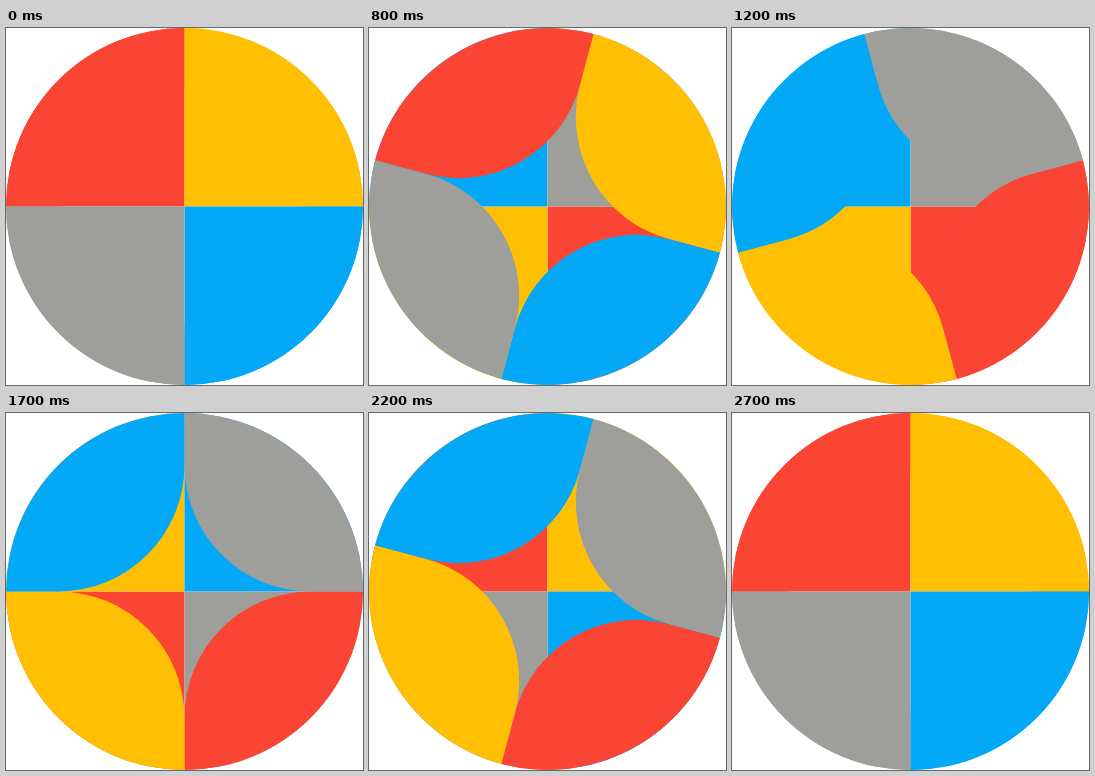
An HTML page with a canvas for the animation above (2800 ms loop, 357 by 357 pixels).

```html
<!DOCTYPE html>
<html lang="en">
<head>
<meta charset="utf-8">
<title>Turning quadrants</title>
<style>
html, body { margin: 0; width: 100%; height: 100%; overflow: hidden; background: #fff; }
canvas { display: block; }
</style>
</head>
<body>
<canvas id="stage" width="357" height="357"></canvas>
<script>
const ctx = document.getElementById('stage').getContext('2d');
const SIZE = 357, R = SIZE / 2, CORNER = R / Math.SQRT2;
const STEP = 100, PHASE = 700, LOOP = 2800;
const COLORS = ['#fa4535', '#ffc003', '#03a9f7', '#9e9f9a']; // clockwise from top left

// Six discrete steps of 15, 30, 45, 45, 30 and 15 degrees, then a rest.
function turn(ms) {
  const k = Math.max(0, Math.min(6, Math.floor(ms / STEP)));
  return k <= 3 ? 7.5 * k * (k + 1) : 180 - 7.5 * (6 - k) * (7 - k);
}

function drawDisc(degrees, corner) {
  COLORS.forEach((color, i) => {
    ctx.save();
    ctx.translate(R, R);
    ctx.rotate((degrees + i * 90) * Math.PI / 180);
    ctx.beginPath();
    ctx.arc(0, 0, R, Math.PI, Math.PI * 1.5);
    ctx.arcTo(0, 0, -R, 0, corner);
    ctx.closePath();
    ctx.fillStyle = color;
    ctx.fill();
    ctx.restore();
  });
}

function frame(now) {
  const t = now % LOOP;
  ctx.clearRect(0, 0, SIZE, SIZE);
  drawDisc(turn(t) + turn(t - 2 * PHASE), 0);
  drawDisc(turn(t - PHASE) + turn(t - 3 * PHASE), CORNER);
  requestAnimationFrame(frame);
}
frame(0);
</script>
</body>
</html>
```
